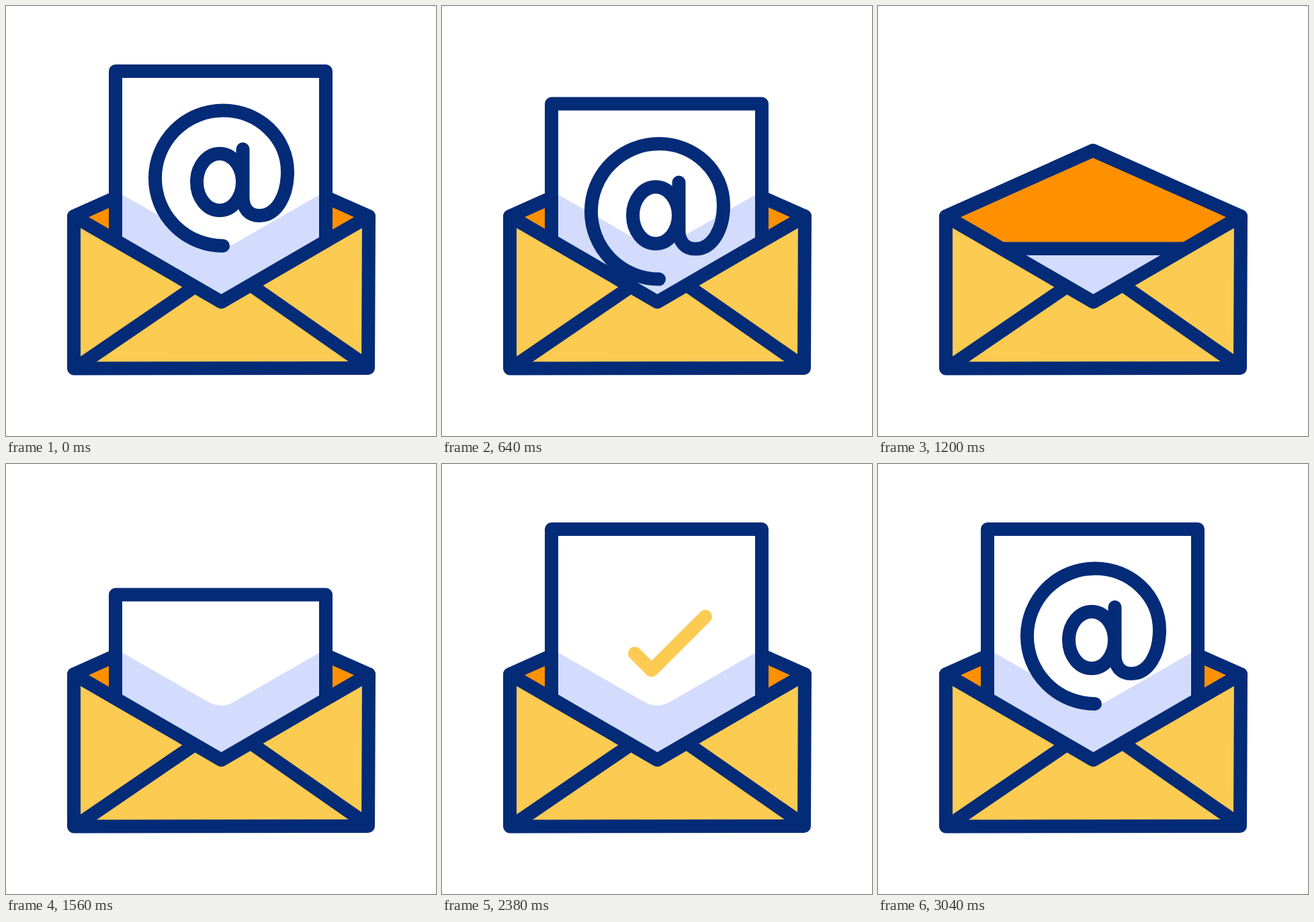
Recreate the animation shown at these times as an HTML page. Size 640x640 px, loop 3600 ms.

```html
<!DOCTYPE html>
<html lang="en">
<head>
<meta charset="utf-8">
<title>Envelope</title>
<style>
  html, body { margin: 0; width: 100%; height: 100%; overflow: hidden; background: #fff; }
  svg { display: block; width: 100vw; height: 100vh; }
  .line { fill: none; stroke: #042b77; stroke-width: 20; stroke-linecap: round; stroke-linejoin: round; }
  .gold { stroke: #fdcb52; }
</style>
</head>
<body>
<svg viewBox="0 0 640 640">
  <defs>
    <clipPath id="inside"><rect id="window" x="173" width="293"/></clipPath>
  </defs>

  <path fill="#ff9100" d="M101 313L320 215L540 313L320 440Z"/>
  <path class="line" d="M101 313L320 215L540 313"/>

  <rect id="sheet" x="163" width="313" class="line" style="fill:#fff"/>
  <g clip-path="url(#inside)">
    <path fill="#d3dcfd" d="M150 267.5L299 353Q320 366 341 353L490 267.5V450H150Z"/>
    <g id="art">
      <g id="at" class="line">
        <path pathLength="1" d="M352.5 213V284C352.5 302 362 312 377 312C403 312 419 282 419 247
          C419 196 376 155.5 323 155.5A101 100.7 0 0 0 323 357"/>
        <path pathLength="1" d="M352 262A34 42.3 0 0 0 284 262A34 42.3 0 0 0 352 262"/>
      </g>
      <path id="check" class="line gold" pathLength="1" d="M267 262L312 307L392 227"/>
      <g id="rays" class="line gold">
        <path pathLength="1" d="M287 216.5L266 190"/>
        <path pathLength="1" d="M319 204V170"/>
        <path pathLength="1" d="M352.5 213.5L373 187"/>
      </g>
    </g>
  </g>

  <path fill="#fccb52" d="M101 313L320.5 440.5L540 313L539 539H101Z"/>
  <path class="line" d="M101 313L320.5 440.5L540 313L539 539L101 539.5Z"/>
  <path class="line" style="stroke-linecap:butt" d="M101 540.5L276 421M540 538L366 416.6"/>
</svg>
<script>
const LOOP = 3600, DROP = 285, ART_DROP = 291, BOTTOM = 1100;
const $ = id => document.getElementById(id);
const sheet = $('sheet'), hole = $('window'), art = $('art');
const at = [...$('at').children], rays = [...$('rays').children], check = [$('check')];

// Cubic bezier easing through (x1, y1) and (x2, y2)
function bezier(x1, y1, x2, y2) {
  const curve = (a, b, s) => 3 * a * s * (1 - s) ** 2 + 3 * b * s * s * (1 - s) + s ** 3;
  return u => {
    if (u <= 0 || u >= 1) return u <= 0 ? 0 : 1;
    let lo = 0, hi = 1;
    for (let i = 0; i < 24; i++) {
      const mid = (lo + hi) / 2;
      if (curve(x1, x2, mid) < u) lo = mid; else hi = mid;
    }
    return curve(y1, y2, lo);
  };
}

const smooth = bezier(.333, 0, .667, 1);
const sink = bezier(.8, 0, .5, 1);
const rise = bezier(.22, 0, .67, 1);
const shoot = bezier(.33, .33, .67, 1);

const span = (t, from, to, ease = smooth) => ease((t - from) / (to - from));

// Show only the part of each path between a and b (0 to 1)
function trim(paths, a, b) {
  for (const p of paths) {
    p.style.display = b - a > .0005 ? '' : 'none';
    p.style.strokeDasharray = `${Math.max(0, b - a)} 2`;
    p.style.strokeDashoffset = -a;
  }
}

function draw(t) {
  const depth = span(t, 285, BOTTOM, sink) - span(t, BOTTOM, 1900, rise);
  const y = DROP * depth;
  sheet.setAttribute('y', 97 + y);
  sheet.setAttribute('height', 436 - y);
  hole.setAttribute('y', 107 + y);
  hole.setAttribute('height', 426 - y);
  art.setAttribute('transform', `translate(0 ${ART_DROP * depth})`);

  trim(at, 0, t < BOTTOM ? 1 : span(t, 2640, 3035));
  trim(check, span(t, 2300, 2620), span(t, 1580, 1875));
  trim(rays, span(t, 1980, 2310), span(t, 1860, 2120, shoot));
}

const start = performance.now();
function tick() {
  draw((performance.now() - start) % LOOP);
  requestAnimationFrame(tick);
}
tick();
</script>
</body>
</html>
```
